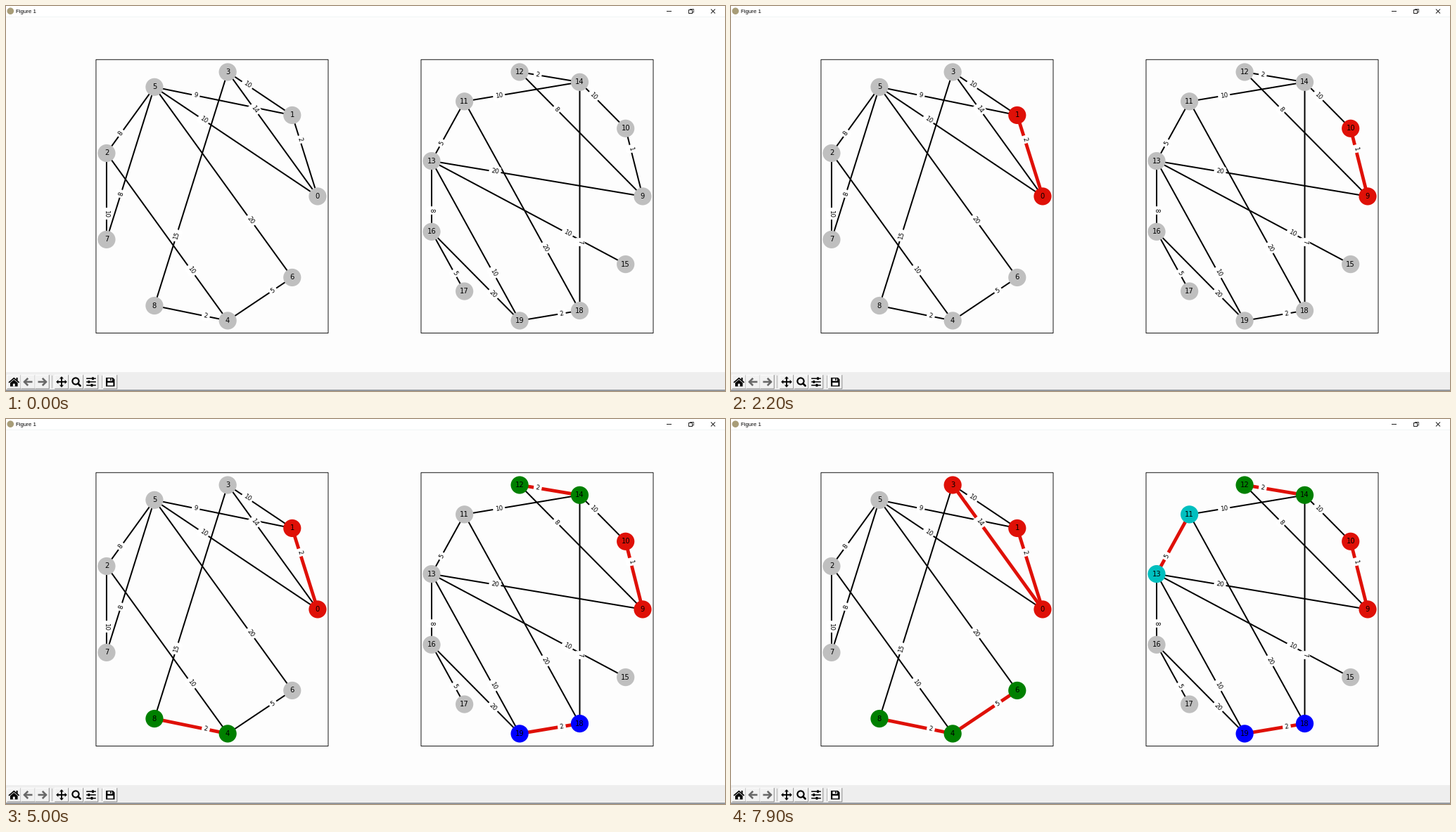
Animation, 1022 px wide and 548 px high, one loop 8 s. Source, as a matplotlib script:

```python
from itertools import pairwise

import numpy as np
import matplotlib.pyplot as plt
from matplotlib.animation import FuncAnimation
from matplotlib.patches import Circle, Polygon, Rectangle

W, H, DPI = 1022, 548, 100
PT = 72 / DPI  # points per pixel
FRAMES, INTERVAL = 80, 100
FIRST, STEP = 8, 10  # frame of the first selected edge, frames between edges

GREY, RED = "#bfbfbf", "#df1007"
TREE_COLORS = [RED, "#008000", "#0000ff", "#00bfbf"]
EDGE_W, PICK_W = 2.0, 4.8

# canvas between title bar and toolbar, split into two subplots
LEFT, TOP, BOTTOM = 0.2, 15.6, 521.2
BOX_W = 0.775 * W / 2.4
BOX_H = 0.77 * (BOTTOM - TOP)
BOX_Y = TOP + 0.12 * (BOTTOM - TOP)
BOX_X = [LEFT + 0.125 * W + 1.4 * BOX_W * k for k in (0, 1)]

# nodes counter-clockwise from the right
RINGS = [
    [0, 1, 3, 5, 2, 7, 8, 4, 6],
    [9, 10, 14, 12, 11, 13, 16, 17, 19, 18, 15],
]

# weight -> trails of equal edges, in the order they are examined
TRAILS = {
    1: [(9, 10)],
    2: [(0, 1), (4, 8), (12, 14), (18, 19)],
    14: [(0, 3)],
    5: [(4, 6), (11, 13), (16, 17)],
    7: [(14, 18)],
    8: [(2, 5, 7), (9, 12), (13, 16)],
    9: [(1, 5)],
    10: [(0, 5), (1, 3), (7, 2, 4), (10, 14, 11), (19, 13, 15)],
    15: [(3, 8)],
    20: [(5, 6), (9, 13), (16, 19), (11, 18)],
}
EDGES = [(*pair, weight) for weight, trails in TRAILS.items()
         for trail in trails for pair in pairwise(trail)]

plt.rcParams["toolbar"] = "None"
plt.rcParams["font.family"] = "DejaVu Sans"
fig = plt.figure(figsize=(W / DPI, H / DPI), dpi=DPI)
ax = fig.add_axes([0, 0, 1, 1])
ax.set_xlim(0, W)
ax.set_ylim(H, 0)
ax.axis("off")


def rect(x, y, w, h, fill="none", edge="none", lw=1.0, z=0):
    ax.add_patch(Rectangle((x, y), w, h, fc=fill, ec=edge, lw=lw * PT,
                           zorder=z, snap=False))


def line(xs, ys, color="black", lw=1.0, z=1, cap="butt"):
    return ax.plot(xs, ys, color=color, lw=lw * PT, zorder=z, snap=False,
                   solid_capstyle=cap, solid_joinstyle="miter")[0]


def poly(points, color="black", z=6):
    ax.add_patch(Polygon(points, fc=color, ec="none", zorder=z))


def disc(x, y, r, fill, edge="none", lw=0.0, z=2):
    patch = Circle((x, y), r, fc=fill, ec=edge, lw=lw * PT, zorder=z)
    ax.add_patch(patch)
    return patch


def draw_window():
    rect(0, 0, W, H, "#fdfdfd")
    rect(0, 0, W, TOP, "#ffffff")
    line([0, W], [15.5, 15.5], "#f0f5f5", z=0.5)
    disc(6.3, 7.2, 4.8, "#a89d78")
    ax.text(14, 10.4, "Figure 1", family="Liberation Sans", size=7.9 * PT)
    line([939, 946], [7.5, 7.5], "#222222")
    rect(970.5, 5.5, 5, 5, edge="#222222", z=1)
    line([972.5, 972.5, 977.5, 977.5, 975.5], [5.5, 4.5, 4.5, 9, 9], "#222222", 0.8)
    for rise in (3, -3):
        line([1002, 1008], [7.5 - rise, 7.5 + rise], "#222222")


def draw_button(x, y, r=9.8):
    rect(x - r, y - r, 2 * r, 2 * r, "#f2f2f2", z=1)
    line([x - r, x - r, x + r], [y + r, y - r, y - r], "#ffffff", z=2)
    line([x - r, x + r, x + r], [y + r, y + r, y - r], "#8c8c8c", z=2)


def draw_arrow(x, y, d):
    line([x - 6 * d, x + 6 * d], [y, y], "#686868", 2.6, 6)
    line([x + 0.3 * d, x + 5.4 * d, x + 0.3 * d], [y - 5.2, y, y + 5.2], "#686868", 2.6, 6)


def draw_home(x, y):
    line([x - 7.3, x, x + 7.3], [y + 1, y - 5.2, y + 1], lw=1.7, z=6)
    poly([(x - 5.3, y + 1.4), (x, y - 3), (x + 5.3, y + 1.4),
          (x + 5.3, y + 6.5), (x - 5.3, y + 6.5)])
    rect(x - 1.5, y + 2.6, 3, 4, "#f2f2f2", z=7)
    rect(x + 3.3, y - 6, 2, 4, "black", z=6)


def draw_pan(x, y):
    for turn in range(4):
        a = turn * np.pi / 2
        out, side = np.array([np.cos(a), np.sin(a)]), np.array([-np.sin(a), np.cos(a)])
        tip = np.array([x, y]) + 7.8 * out
        line([x, x + 6 * out[0]], [y, y + 6 * out[1]], lw=1.9, z=6)
        poly([tip, tip - 3.2 * out + 3 * side, tip - 3.2 * out - 3 * side])


def draw_zoom(x, y):
    disc(x - 1, y - 1, 4.6, "none", "black", 2.1, 6)
    line([x + 2.4, x + 5.6], [y + 2.4, y + 5.6], lw=2.7, z=6, cap="round")


def draw_sliders(x, y):
    for dy, knob in ((-4.8, 2.5), (0, -3.2), (4.8, 1)):
        line([x - 6.8, x + 6.8], [y + dy, y + dy], lw=1.5, z=6)
        rect(x + knob - 1.4, y + dy - 1.9, 2.8, 3.8, "black", z=6)


def draw_save(x, y):
    poly([(x - 6, y - 6), (x + 4, y - 6), (x + 6.5, y - 3.5),
          (x + 6.5, y + 6.5), (x - 6, y + 6.5)])
    rect(x - 3.6, y - 4.8, 6.6, 3.6, "#f2f2f2", z=7)
    rect(x + 0.2, y - 4.8, 1.6, 2.8, "black", z=8)
    rect(x - 3.8, y + 1, 8.2, 4.2, "#f2f2f2", z=7)


def draw_toolbar(y=535):
    rect(0, BOTTOM, W, H - BOTTOM, "#eeeeee")
    line([0, W], [547, 547], "#70757f", 1.4)
    for x in (65.5, 136.5):
        line([x, x], [526, 544], "#b5b5b5")
    icons = {
        11.3: draw_home,
        31.5: lambda x, y: draw_arrow(x, y, -1),
        51.5: lambda x, y: draw_arrow(x, y, 1),
        79: draw_pan, 100: draw_zoom, 121: draw_sliders, 148: draw_save,
    }
    for x, draw in icons.items():
        draw_button(x, y)
        draw(x, y)


def place_ring(ring, box_x):
    """Spread the ring over its box, leaving the usual 5% margins."""
    a = 2 * np.pi * np.arange(len(ring)) / len(ring)
    points = np.column_stack([np.cos(a), -np.sin(a)])
    low, high = points.min(axis=0), points.max(axis=0)
    size = np.array([BOX_W, BOX_H])
    unit = (points - low) / (high - low)
    return dict(zip(ring, [box_x, BOX_Y] + size * (0.05 + unit) / 1.1))


def label_angle(p, q):
    dx, dy = q - p
    return -90 if abs(dx) < 0.01 else np.degrees(np.arctan(-dy / dx))


def draw_graphs():
    pos = {}
    for ring, x in zip(RINGS, BOX_X):
        rect(x, BOX_Y, BOX_W, BOX_H, edge="black", lw=0.9, z=4)
        pos |= place_ring(ring, x)
    rank = {node: i for i, node in enumerate(pos)}
    lines, nodes = [], {}
    for a, b, weight in EDGES:
        a, b = sorted((a, b), key=rank.get)
        p, q = pos[a], pos[b]
        lines.append(line([p[0], q[0]], [p[1], q[1]], lw=EDGE_W))
        x, y = 0.3 * p + 0.7 * q  # labels sit nearer the later node
        ax.text(x, y, str(weight), size=8.8 * PT, rotation=label_angle(p, q),
                ha="center", va="center", zorder=1.5,
                bbox=dict(boxstyle="round", fc="white", ec="white", lw=0.5))
    for node, (x, y) in pos.items():
        nodes[node] = disc(x, y, 12.6, GREY)
        ax.text(x, y, str(node), size=10 * PT, ha="center", va="center", zorder=3)
    return lines, nodes


def node_colors(count):
    """Each new tree takes the next colour of its own graph."""
    colors, palettes = {}, [iter(TREE_COLORS) for _ in RINGS]
    for a, b, _ in EDGES[:count]:
        color = colors.get(a) or colors.get(b) or next(palettes[a not in RINGS[0]])
        colors[a] = colors[b] = color
    return colors


draw_window()
draw_toolbar()
edge_lines, node_discs = draw_graphs()


def update(frame):
    count = max(0, 1 + (frame - FIRST) // STEP)
    for i, item in enumerate(edge_lines):
        picked = i < count
        item.set(color=RED if picked else "black",
                 linewidth=(PICK_W if picked else EDGE_W) * PT)
    colors = node_colors(count)
    for node, item in node_discs.items():
        item.set_facecolor(colors.get(node, GREY))
    return [*edge_lines, *node_discs.values()]


anim = FuncAnimation(fig, update, frames=FRAMES, interval=INTERVAL,
                     repeat=True, repeat_delay=0, blit=False)
plt.show()
```
